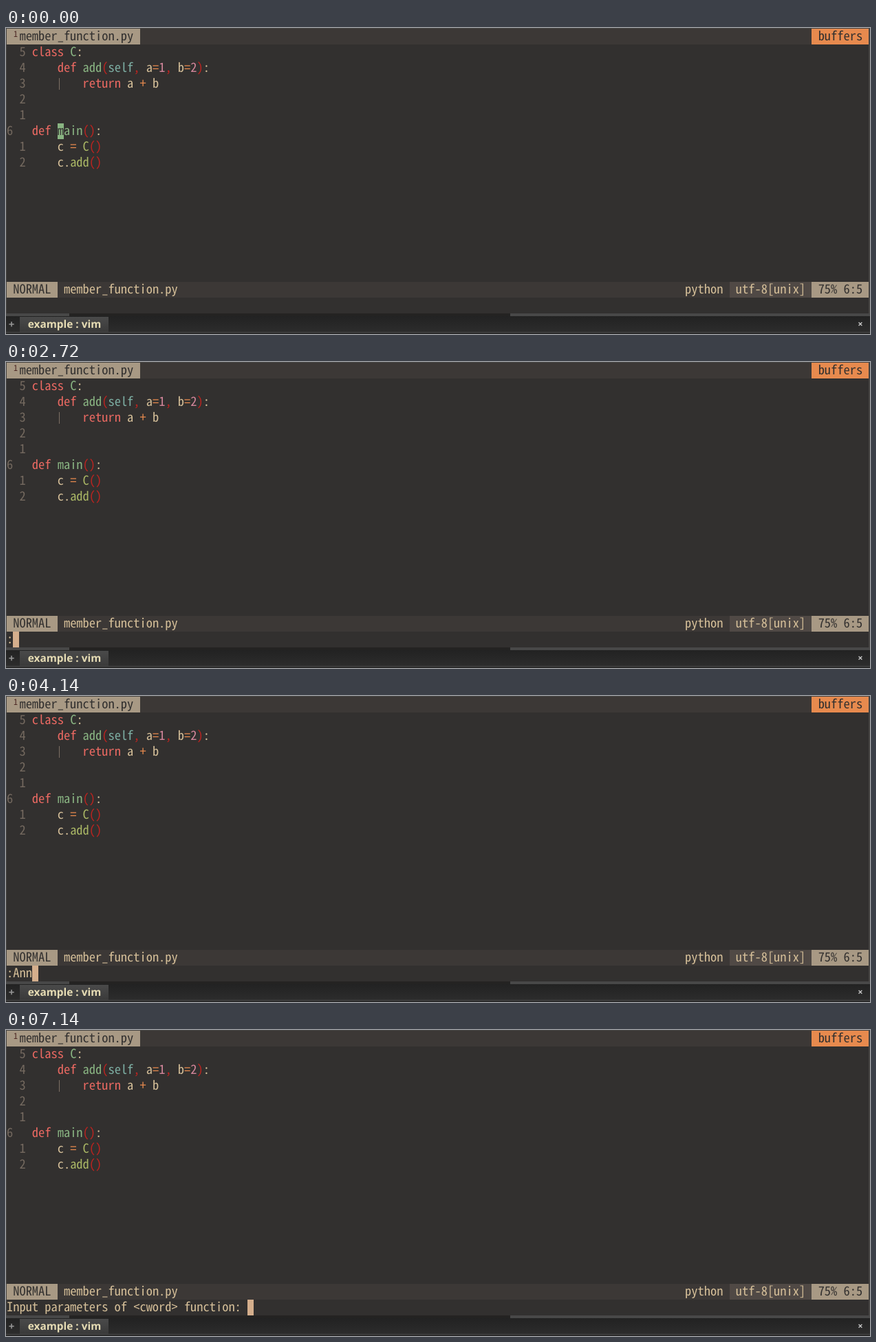
These frames come from a looping animation (1256 px wide and 446 px high, 8 s). An HTML page:

```html
<!DOCTYPE html>
<html lang="en">
<head>
<meta charset="utf-8">
<title>Editor command line</title>
<style>
  html, body { margin: 0; width: 100%; height: 100%; overflow: hidden; background: #32302f; }
  svg { display: block; width: 100%; height: 100%; }
  text { white-space: pre; font-variant-ligatures: none; text-rendering: geometricPrecision; }
  .ui { font-family: "Noto Sans", sans-serif; }
</style>
</head>
<body>
<svg id="stage" viewBox="0 0 1256 446" preserveAspectRatio="none">
  <defs>
    <linearGradient id="bar" x2="0" y2="1">
      <stop stop-color="#222222"/><stop offset="1" stop-color="#2e2e2e"/>
    </linearGradient>
    <linearGradient id="tab" x2="0" y2="1">
      <stop stop-color="#4a4a4a"/><stop offset="1" stop-color="#3a3a3a"/>
    </linearGradient>
    <clipPath id="strip"><rect x="92" y="416" width="641" height="2"/></clipPath>
  </defs>
</svg>
<script>
const LOOP = 8000, CELL = 9.216, ROW = 23.06;
const MONO = '"Noto Sans Mono CJK JP", "Noto Sans Mono CJK SC", "Noto Sans Mono", monospace';
const C = {
  bg: '#32302f', bar: '#3c3836', mid: '#504945', tan: '#a89984', num: '#74695f',
  fg: '#d4be98', red: '#ea6962', orange: '#e78a4e', green: '#a9b665',
  aqua: '#89b482', blue: '#7daea3', purple: '#d3869b', paren: '#bc2420', cursor: '#d4ae8c'
};
const stage = document.getElementById('stage');

// Choose the type size whose advance fills one terminal cell.
const pen = document.createElement('canvas').getContext('2d');
pen.font = '100px ' + MONO;
const SIZE = CELL * 1000 / pen.measureText('0000000000').width;

function add(tag, attrs, content = '') {
  const node = document.createElementNS('http://www.w3.org/2000/svg', tag);
  for (const key in attrs) node.setAttribute(key, attrs[key]);
  node.textContent = content;
  return stage.appendChild(node);
}
const rect = (x, y, width, height, fill) => add('rect', { x, y, width, height, fill });
const colX = col => 1 + col * CELL;
const edge = col => Math.round(colX(col));
const rowY = row => Math.round(1 + row * ROW);
const cells = (row, col, count, fill) =>
  rect(edge(col), rowY(row), edge(col + count) - edge(col), rowY(row + 1) - rowY(row), fill);
const type = (row, col, content, fill) =>
  add('text', { x: colX(col), y: rowY(row) + 17, fill, 'font-size': SIZE, 'font-family': MONO }, content);

// Alternating colour and text pieces, laid out from a column.
function line(row, col, ...parts) {
  for (let i = 0; i < parts.length; i += 2) {
    type(row, col, parts[i + 1], C[parts[i]]);
    col += parts[i + 1].length;
  }
}

rect(0, 0, 1256, 446, '#454341');
rect(1, 1, 1253, 415, C.bg);

// Buffer line
cells(0, 0, 136, C.bar);
cells(0, 0, 21, C.tan);
add('text', { x: 11, y: 13, fill: '#4a2522', 'font-size': 12, 'font-family': MONO }, '1');
type(0, 2, 'member_function.py', C.bg);
cells(0, 127, 9, C.orange);
type(0, 128, 'buffers', C.bg);

// Code
[5, 4, 3, 2, 1, 6, 1, 2].forEach((n, i) => type(i + 1, n === 6 ? 0 : 2, String(n), C.num));
line(1, 4, 'red', 'class', 'aqua', ' C', 'fg', ':');
line(2, 8, 'red', 'def', 'aqua', ' add', 'paren', '(', 'blue', 'self', 'paren', ',',
  'fg', ' a', 'orange', '=', 'purple', '1', 'paren', ',',
  'fg', ' b', 'orange', '=', 'purple', '2', 'paren', ')', 'fg', ':');
rect(77, 73, 1, 17, '#7c6f64');
line(3, 12, 'red', 'return', 'fg', ' a', 'orange', ' +', 'fg', ' b');
line(6, 4, 'red', 'def');
const block = cells(6, 8, 1, C.aqua);
const initial = type(6, 8, 'm', C.aqua);
line(6, 9, 'aqua', 'ain', 'paren', '()', 'fg', ':');
line(7, 8, 'fg', 'c', 'orange', ' =', 'green', ' C', 'paren', '()');
line(8, 8, 'fg', 'c.', 'green', 'add', 'paren', '()');

// Status line
cells(16, 0, 136, C.bar);
cells(16, 0, 8, C.tan);
type(16, 1, 'NORMAL', C.bg);
type(16, 9, 'member_function.py', C.fg);
type(16, 107, 'python', C.fg);
cells(16, 114, 13, C.mid);
type(16, 115, 'utf-8[unix]', C.fg);
cells(16, 127, 9, C.tan);
type(16, 128, '75% 6:5', C.bg);

// Command line
const command = type(17, 0, '', C.fg);
const caret = cells(17, 0, 1, C.cursor);

// Scroll strip and terminal tabs
rect(0, 416, 1256, 4, '#484848');
rect(92, 416, 641, 4, '#242322');
const ghost = add('text', {
  x: 130, y: 418, fill: '#4a4744', 'font-size': SIZE, 'font-family': MONO, 'clip-path': 'url(#strip)'
}, '2     c.add');
rect(0, 420, 1256, 26, 'url(#bar)');
rect(20, 421, 129, 22, 'url(#tab)');
rect(0, 443, 1256, 1, '#484848');
rect(0, 444, 1256, 2, '#2a2a2a');
const label = (x, y, size, weight, fill, content) => add('text', {
  class: 'ui', x, y, fill, 'font-size': size, 'font-weight': weight, 'text-anchor': 'middle'
}, content);
label(8, 437, 15, 700, '#969696', '+');
label(85, 437, 15.4, 700, '#e6dcb4', 'example : vim');
label(1242, 436, 13, 700, '#c8c8c8', '×');

const PROMPTS = [
  [2310, ':'], [3010, ':A'], [3450, ':An'], [4140, ':Ann'], [4870, ':Anno'],
  [5130, ':AnnotatePyFile'], [7140, 'Input parameters of <cword> function: ']
];

function draw(t) {
  const step = PROMPTS.filter(([start]) => t >= start).pop();
  const content = step ? step[1] : '';
  const col = content.length;
  command.textContent = content;
  caret.setAttribute('x', edge(col));
  caret.setAttribute('width', edge(col + 1) - edge(col));
  caret.setAttribute('visibility', step ? 'visible' : 'hidden');
  block.setAttribute('visibility', step ? 'hidden' : 'visible');
  initial.setAttribute('fill', step ? C.aqua : C.bg);
  ghost.setAttribute('opacity', t < 370 || t >= 2720 ? 0 : t < 420 ? 0.5 : 1);
}

const begin = performance.now();
function tick() {
  draw((performance.now() - begin) % LOOP);
  requestAnimationFrame(tick);
}
tick();
</script>
</body>
</html>
```
